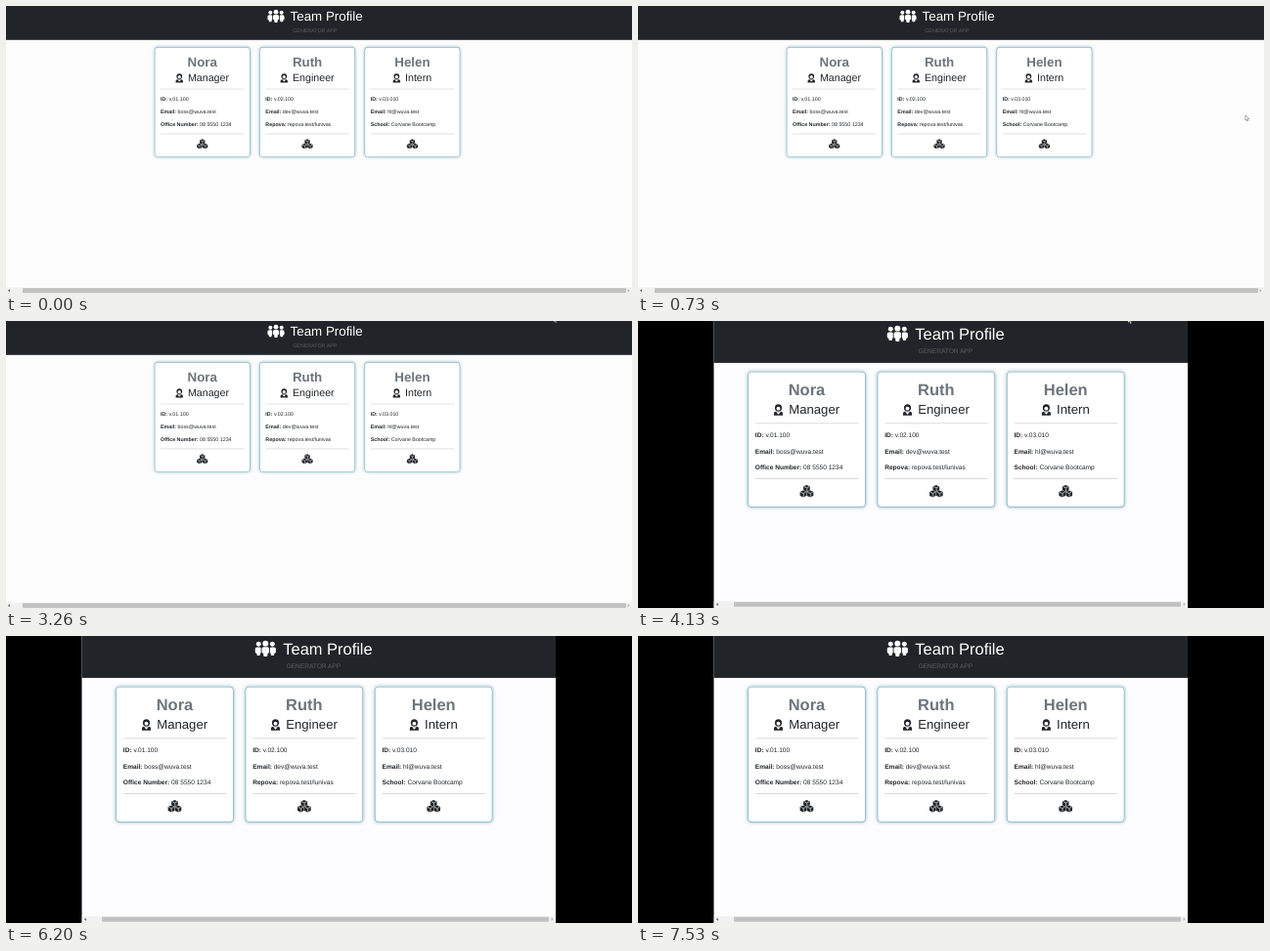
Recreate the animation shown at these times as an HTML page with a canvas. Size 640x294 px, loop 8 s.

```html
<!DOCTYPE html>
<html lang="en">
<head>
<title>Team Profile</title>
<style>
  html, body { margin: 0; width: 100%; height: 100%; overflow: hidden; background: #000; }
  canvas { display: block; width: 100vw; height: 100vh; }
</style>
</head>
<body>
<canvas id="stage" width="640" height="294"></canvas>
<script>
const ctx = document.getElementById('stage').getContext('2d');
const LOOP = 8000, ZOOM_AT = 4130;
const INK = '#212529', GREY = '#6c757d', WHITE = '#fff';
const FONT = '"Liberation Sans", Arial, sans-serif';
const H1 = 40 / 3, H2 = 32 / 3, BODY = 16 / 3;

const WIDE = { zoom: 1, dx: 0, left: 0, right: 640, bg: '#fdfdfd',
               bar: 288.4, thumb: [17, 634], arrows: [3, 636.5] };
const NEAR = { zoom: 1.233, dx: -75, left: 77.5, right: 562, bg: '#fdfcfe',
               bar: 287.2, thumb: [98, 555], arrows: [81, 558.5] };

const cards = [
  { name: 'Nora', role: 'Manager', rows: [['ID:', 'v.01.100'],
    ['Email:', 'boss@wuva.test'], ['Office Number:', '08 5550 1234']] },
  { name: 'Ruth', role: 'Engineer', rows: [['ID:', 'v.02.100'],
    ['Email:', 'dev@wuva.test'], ['Repova:', 'repova.test/lunivas']] },
  { name: 'Helen', role: 'Intern', rows: [['ID:', 'v.03.010'],
    ['Email:', 'hl@wuva.test'], ['School:', 'Corvane Bootcamp']] }
];

// Cursor moves: [start, end, hidden from, x0, y0, x1, y1]
const moves = [
  [60, 730, 2660, 283, 9, 621, 112],
  [2660, 3130, 3130, 611, 94, 611, 94],
  [3130, 3260, 4130, 598, 52, 560, -4],
  [4130, 5130, 5130, 501, -4.5, 501, -4.5],
  [7130, 7530, 7530, 230, 24, 180, 139]
];

function text(str, x, y, size, color, weight = '', align = 'left') {
  ctx.font = `${weight} ${size}px ${FONT}`;
  ctx.textAlign = align;
  ctx.fillStyle = color;
  ctx.fillText(str, x, y);
  return ctx.measureText(str).width;
}

function dot(x, y, r, color) {
  ctx.fillStyle = color;
  ctx.beginPath();
  ctx.arc(x, y, r, 0, Math.PI * 2);
  ctx.fill();
}

function box(x, y, w, h, r, color) {
  ctx.fillStyle = color;
  ctx.beginPath();
  ctx.roundRect(x, y, w, h, r);
  ctx.fill();
}

function poly(points, color) {
  ctx.fillStyle = color;
  ctx.beginPath();
  points.forEach(([x, y]) => ctx.lineTo(x, y));
  ctx.closePath();
  ctx.fill();
}

function groupIcon(x, y) {
  for (const s of [-1, 1]) {
    dot(x + s * 5.7, y - 3.8, 2, WHITE);
    box(x + s * 6 - 2.6, y - 1.2, 5.2, 5.2, 1.6, WHITE);
    box(x + s * 5.8 - 1.4, y + 2, 2.8, 3.8, 0.8, WHITE);
  }
  box(x - 3.8, y - 2, 7.6, 6.4, 2, INK);
  dot(x, y - 4.3, 2.4, WHITE);
  box(x - 3.1, y - 1.4, 6.2, 5.4, 1.8, WHITE);
  box(x - 1.7, y + 2, 3.4, 4.6, 1, WHITE);
}

function personIcon(x, y) {
  dot(x, y - 1.8, 2.9, INK);
  dot(x, y - 1.2, 1.6, WHITE);
  box(x - 3.7, y + 1.3, 7.4, 3.3, [1.7, 1.7, 0.5, 0.5], INK);
  poly([[x - 1.9, y + 1.7], [x + 1.9, y + 1.7], [x, y + 3.7]], WHITE);
}

function cube(x, y) {
  const w = 2.7;
  poly([[x, y - 2.7], [x + w, y - 1.5], [x + w, y + 1.6],
        [x, y + 2.8], [x - w, y + 1.6], [x - w, y - 1.5]], INK);
  ctx.strokeStyle = WHITE;
  ctx.lineWidth = 0.5;
  ctx.beginPath();
  ctx.moveTo(x - w + 0.5, y - 1.3);
  ctx.lineTo(x, y - 0.3);
  ctx.lineTo(x + w - 0.5, y - 1.3);
  ctx.moveTo(x + 0.3, y);
  ctx.lineTo(x + 0.3, y + 2.3);
  ctx.stroke();
}

function cubesIcon(x, y) {
  cube(x, y - 2.4);
  cube(x - 2.85, y + 2.2);
  cube(x + 2.85, y + 2.2);
}

function card({ name, role, rows }, i, zoom) {
  const x = 152 + i * 107.35, mid = x + 48.7;
  ctx.save();
  ctx.shadowColor = 'rgba(70, 140, 160, 0.75)';
  ctx.shadowBlur = 3.2 * zoom;
  box(x, 42.2, 97.4, 112.4, 3, '#7fb0bd');
  ctx.restore();
  box(x + 0.45, 42.65, 96.5, 111.5, 2.6, WHITE);

  text(name, mid, 61.6, H1, GREY, 'bold', 'center');
  ctx.font = `${H2}px ${FONT}`;
  const start = mid - (ctx.measureText(role).width + 12.5) / 2;
  personIcon(start + 3.8, 73.9);
  text(role, start + 12.5, 77.3, H2, INK);

  ctx.fillStyle = '#d3d5d7';
  ctx.fillRect(x + 6, 84.7, 85.6, 0.7);
  ctx.fillRect(x + 6, 130.6, 85.6, 0.7);
  rows.forEach(([label, value], n) => {
    const y = 96.6 + n * 13.3;
    const w = text(label, x + 6, y, BODY, INK, 'bold');
    text(value, x + 6 + w + BODY * 0.278, y, BODY, INK);
  });
  cubesIcon(mid, 141.3);
}

function scrollbar({ left, right, bar, thumb, arrows }) {
  ctx.fillStyle = '#f1f1f1';
  ctx.fillRect(left, bar, right - left, 294 - bar);
  ctx.fillStyle = '#c1c1c1';
  ctx.fillRect(thumb[0], bar + 0.6, thumb[1] - thumb[0], 4.9);
  const y = bar + 3;
  arrows.forEach((x, n) => {
    const s = n ? 1 : -1;
    poly([[x + s, y], [x - s * 0.8, y - 1.5], [x - s * 0.8, y + 1.5]], n ? '#a3a3a3' : '#505050');
  });
}

function page(view) {
  ctx.save();
  ctx.beginPath();
  ctx.rect(view.left, 0, view.right - view.left, 294);
  ctx.clip();
  ctx.fillStyle = view.bg;
  ctx.fillRect(0, 0, 640, 294);
  ctx.save();
  ctx.translate(view.dx, 0);
  ctx.scale(view.zoom, view.zoom);
  ctx.fillStyle = INK;
  ctx.fillRect(0, 0, 640, 34.8);
  groupIcon(276, 10.5);
  text('Team Profile', 290.6, 15.4, H1, WHITE);
  text('GENERATOR APP', 293.2, 27, BODY, '#596066');
  cards.forEach((c, i) => card(c, i, view.zoom));
  ctx.restore();
  scrollbar(view);
  ctx.restore();
}

function cursor(t, zoom) {
  const m = moves.find(([start, , hide]) => t >= start && t < hide);
  if (!m) return;
  const [start, end, , x0, y0, x1, y1] = m;
  const p = Math.min(1, (t - start) / (end - start));
  const k = p * p * (3 - 2 * p);
  ctx.save();
  ctx.translate(x0 + (x1 - x0) * k, y0 + (y1 - y0) * k);
  ctx.scale(zoom, zoom);
  poly([[0, 0], [0, 5.2], [1.2, 4.1], [2, 6], [2.9, 5.6], [2.1, 3.8], [3.8, 3.7]], WHITE);
  ctx.strokeStyle = '#444';
  ctx.lineWidth = 0.45;
  ctx.stroke();
  ctx.restore();
}

function draw(now) {
  const t = now % LOOP;
  const view = t < ZOOM_AT ? WIDE : NEAR;
  ctx.fillStyle = '#000';
  ctx.fillRect(0, 0, 640, 294);
  page(view);
  cursor(t, view.zoom);
}

ctx.textRendering = 'geometricPrecision';
const began = performance.now();
function tick() {
  draw(performance.now() - began);
  requestAnimationFrame(tick);
}
tick();
</script>
</body>
</html>
```
